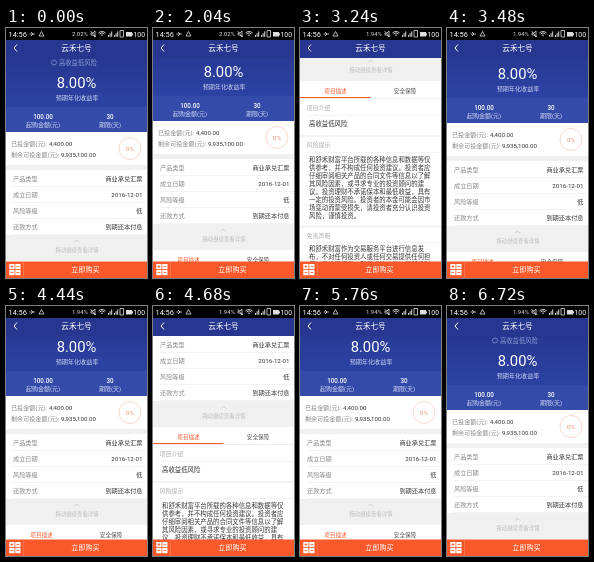
Animation of 141x250 px, one loop 6.84 s. Source, as an HTML page with a canvas:

```html
<!DOCTYPE html>
<html lang="zh">
<head>
<meta charset="utf-8">
<style>
html, body { margin: 0; width: 100%; height: 100%; overflow: hidden; background: #fff; }
canvas { display: block; width: 141px; height: 250px; }
</style>
</head>
<body>
<canvas width="141" height="250"></canvas>
<script>
const ctx = document.querySelector('canvas').getContext('2d');
const LOOP = 6840, STEP = 120, PAGE = 203;
const ORANGE = '#f9582a', BLUE = '#27378f', GRAY = '#858585', DARK = '#333', ICON = '#ddd';

// [time, scroll offset]: drag, snap to the second page, then back.
const scrollKeys = [
  [0, 0], [1920, 0], [2040, 11], [2160, 36], [2280, 105], [2400, 178], [2520, 202], [2640, PAGE],
  [3120, PAGE], [3240, 180], [3360, 62], [3480, 9], [3600, 4], [3720, 1], [3840, 0],
  [4320, 0], [4440, 14], [4560, 42], [4680, 112], [4800, 180], [4920, 200], [5040, PAGE],
  [5400, PAGE], [5520, 180], [5640, 70], [5760, 14], [5880, 3], [6000, 0], [LOOP, 0]
];

function scrollAt(time) {
  const i = scrollKeys.findIndex(key => key[0] > time);
  const [t0, y0] = scrollKeys[i - 1], [t1, y1] = scrollKeys[i];
  return y0 + (y1 - y0) * (time - t0) / (t1 - t0);
}

function rect(x, y, w, h, color) {
  ctx.fillStyle = color;
  ctx.fillRect(x, y, w, h);
}

// y is the vertical middle of the glyphs.
function text(str, x, y, size, color, align = 'left', weight = 400) {
  ctx.font = `${weight} ${size}px Roboto, "Noto Sans CJK SC", "Noto Sans CJK", sans-serif`;
  ctx.textAlign = align;
  ctx.fillStyle = color;
  ctx.fillText(str, x, y + size * 0.37);
}

function line(points, color, width = 1) {
  ctx.beginPath();
  points.forEach(([x, y]) => ctx.lineTo(x, y));
  ctx.strokeStyle = color;
  ctx.lineWidth = width;
  ctx.stroke();
}

function ring(x, y, r, color, width = 1, from = 0, to = Math.PI * 2) {
  ctx.beginPath();
  ctx.arc(x, y, r, from, to);
  ctx.strokeStyle = color;
  ctx.lineWidth = width;
  ctx.stroke();
}

function drawSummary() {
  const sky = ctx.createLinearGradient(0, 30, 0, 80);
  sky.addColorStop(0, BLUE);
  sky.addColorStop(1, '#2c43a4');
  rect(0, 12, 141, 67, sky);
  rect(0, 79, 141, 25, '#344ba9');
  ring(48, 34.5, 2.5, '#8090d0', 0.8);
  text('高收益低风险', 53, 34.5, 6.3, '#8c9ad6');
  text('8.00%', 70.5, 55, 14.8, '#fff', 'center');
  text('预期年化收益率', 71, 70, 6.1, '#cdd4f2', 'center');
  text('100.00', 37, 88.5, 6.3, '#fff', 'center', 500);
  text('起购金额(元)', 37, 97, 6, '#d5dbf4', 'center');
  text('30', 104, 88.5, 6.3, '#fff', 'center', 500);
  text('期限(天)', 104, 97, 6, '#d5dbf4', 'center');

  text('已投金额(元):', 5, 115.5, 6.1, GRAY);
  text('4,400.00', 43, 115.5, 6.1, DARK);
  text('剩余可投金额(元):', 5, 126.5, 6.1, GRAY);
  text('9,935,100.00', 55, 126.5, 6.1, DARK);
  ring(124, 120.5, 11, '#f6d9ce');
  text('0%', 124, 120.5, 6, '#f08a66', 'center');

  rect(0, 137, 141, 5, '#f0f0f0');
  const rows = [['产品类型', '商业承兑汇票'], ['成立日期', '2016-12-01'],
    ['风险等级', '低'], ['还款方式', '到期还本付息']];
  rows.forEach(([label, value], i) => {
    const y = 150.3 + i * 16;
    text(label, 7, y, 6.2, GRAY);
    text(value, 136.5, y, 6.2, DARK, 'right');
    rect(7, Math.round(y + 8), 134, 0.5, '#e6e6e6');
  });
  rect(0, 207, 141, 26, '#f0f0f0');
  line([[68, 214.5], [70.5, 212], [73, 214.5]], '#c4c4c4', 0.8);
  text('拖动继续查看详情', 71, 222.5, 5.4, '#bdbdbd', 'center');
}

function drawDetails() {
  rect(0, 30, 141, 220, '#fff');
  text('项目描述', 35.5, 40, 5.6, ORANGE, 'center');
  text('安全保障', 105, 40, 5.6, '#555', 'center');
  rect(0, 47, 141, 0.5, '#ddd');
  rect(0, 46, 70.5, 1, ORANGE);

  const sections = [
    [57, 72.5, ['高收益低风险']],
    [94, 109, [
      '和舒禾财富平台所载的各种信息和数据等仅',
      '供参考，并不构成任何投资建议。投资者应',
      '仔细审阅相关产品的合同文件等信息以了解',
      '其风险因素，或寻求专业的投资顾问的建',
      '议。投资理财不承诺保本和最低收益，具有',
      '一定的投资风险。投资者的本金可能会因市',
      '场变动而蒙受损失，请投资者充分认识投资',
      '风险，谨慎投资。']],
    [184.5, 198, [
      '和舒禾财富作为交易服务平台进行信息发',
      '布，不对任何投资人或任何交易提供任何担',
      '保，无论是明示、默示或法定的。和舒禾财',
      '富平台提供的各种信息及资料仅供参考，投',
      '资人应依其独立判断做出决策，投资人据此']]
  ];
  ['项目介绍', '风险提示', '免责声明'].forEach((title, i) => {
    const [titleY, bodyY, lines] = sections[i];
    if (i) rect(0, titleY - 10, 141, 2, '#f3f3f3');
    text(title, 6.5, titleY, 6, '#aaa');
    rect(7, titleY + 7, 134, 0.5, '#e6e6e6');
    lines.forEach((str, n) => text(str, 9, bodyY + n * 8, 6.4, DARK));
  });
}

function drawStatus(load) {
  rect(0, 0, 141, 12, '#000');
  text('14:56', 2.5, 6, 7.4, '#fff');
  line([[23.5, 6], [29, 6]], ICON, 0.8);
  line([[25, 4], [27, 6], [25, 8]], ICON, 0.8);
  line([[33, 8], [35.5, 3.5], [38, 8], [33, 8]], ICON, 0.8);
  text(load, 82, 6, 6, ICON, 'right');
  line([[85, 5], [87, 5], [89, 3], [89, 9], [87, 7], [85, 7], [85, 5]], ICON, 0.8);
  line([[84.5, 3], [90, 9]], ICON, 0.7);
  [1.5, 3.5, 5].forEach(r => ring(96, 8.5, r, ICON, 0.9, -Math.PI * 0.75, -Math.PI * 0.25));
  for (const x of [102, 108]) {
    for (let i = 0; i < 3; i++) rect(x + i * 1.6, 7 - i * 1.8, 1, 1.8 + i * 1.8, ICON);
  }
  line([[114, 2.5], [117.5, 2.5], [117.5, 9], [114, 9], [114, 2.5]], ICON, 0.8);
  rect(120, 4, 6, 4.5, ICON);
  rect(126, 5.3, 1, 2, ICON);
  text('100', 139, 6, 6.8, '#fff', 'right');
}

function drawBars() {
  rect(0, 12, 141, 18, BLUE);
  line([[11, 16.5], [8, 20], [11, 23.5]], '#fff');
  text('云禾七号', 70.5, 20, 7.6, '#fff', 'center');
  rect(0, 233.5, 141, 16.5, ORANGE);
  rect(17.5, 233.5, 0.5, 16.5, '#f98a66');
  for (let i = 0; i < 4; i++) {
    const x = 3.3 + i % 2 * 6, y = 236 + (i >> 1) * 6;
    rect(x, y, 5.2, 5.2, '#fff');
    rect(x + 1.2, y + 2.2, 2.8, 0.8, ORANGE);
    if (i === 0) rect(x + 2.2, y + 1.2, 0.8, 2.8, ORANGE);
  }
  text('立即购买', 79.5, 241, 7.1, '#fff', 'center');
}

function frame(now) {
  const time = Math.floor(now % LOOP / STEP) * STEP;
  const scroll = scrollAt(time);
  rect(0, 0, 141, 250, '#fff');
  ctx.save();
  ctx.translate(0, -scroll);
  drawSummary();
  ctx.translate(0, PAGE);
  drawDetails();
  ctx.restore();
  drawStatus(time < 3240 ? '2.02%' : '1.94%');
  drawBars();
  requestAnimationFrame(frame);
}
requestAnimationFrame(frame);
</script>
</body>
</html>
```
